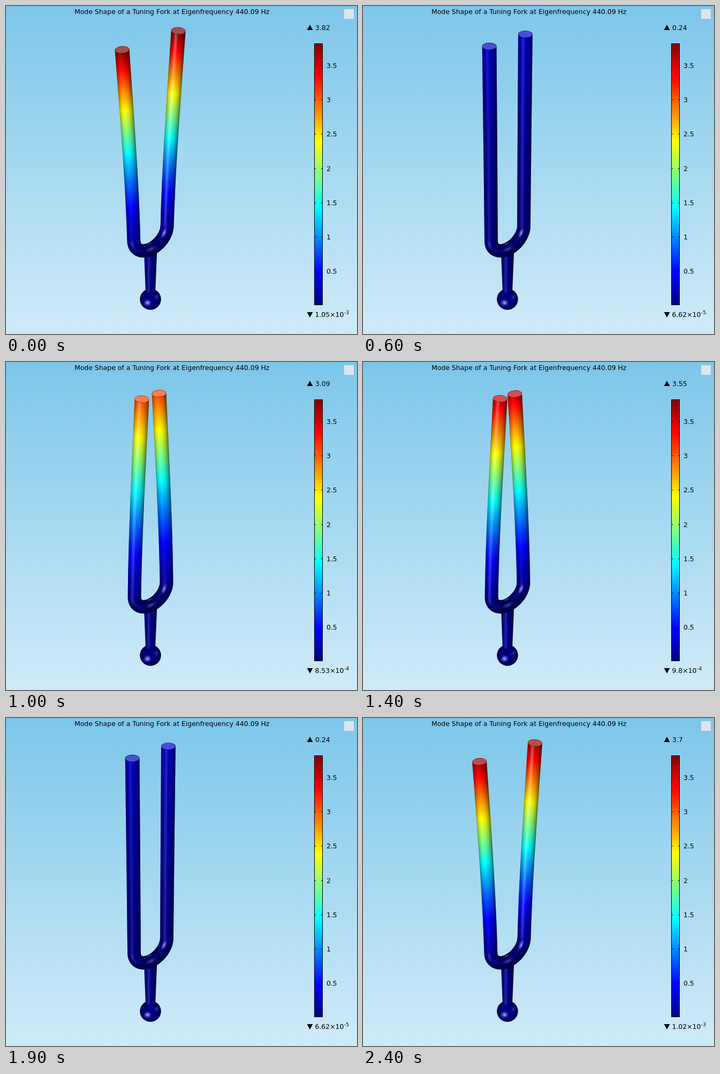
Animation of 656x614 px, one loop 2500 ms. Source, as an HTML page with a canvas:

```html
<!DOCTYPE html>
<html lang="en">
<head>
<meta charset="utf-8">
<title>Tuning fork mode shape</title>
<style>
html, body { margin: 0; width: 656px; height: 614px; overflow: hidden; }
canvas { display: block; }
</style>
</head>
<body>
<canvas id="stage" width="656" height="614"></canvas>
<script>
const ctx = document.getElementById('stage').getContext('2d');
const LOOP = 2500, STEP = 100;
const MAX = 3.816, MIN = 1.0543e-3;
const REACH = 420;   // length of a vibrating arm, down to the middle of the bend
const ARM = 361;     // straight part of it
const FONT = '"DejaVu Sans", sans-serif';

const clamp = (v, lo = 0, hi = 1) => Math.min(hi, Math.max(lo, v));
const lerp = (a, b, k) => a + (b - a) * k;

const left = { tip: [237.4, 75.1], base: [239.5, 440], sway: [-20.4, 6.9] };
const right = { tip: [302.2, 53.4], base: [300.5, 412], sway: [20, -6.9] };

// First bending mode of a cantilever, 1 at the free end
function bend(x) {
  const b = 1.8751 * x;
  return (Math.cosh(b) - Math.cos(b) - 0.7341 * (Math.sinh(b) - Math.sin(b))) / 2;
}

const jet = v => [3, 2, 1].map(k => 255 * clamp(1.5 - Math.abs(4 * v - k)));

function css(color, shade = 1, white = 0) {
  return `rgb(${color.map(c => Math.round(lerp(c * shade, 255, white))).join()})`;
}

function linear(x0, y0, x1, y1, count, colorAt) {
  const g = ctx.createLinearGradient(x0, y0, x1, y1);
  for (let i = 0; i <= count; i++) g.addColorStop(i / count, colorAt(i / count));
  return g;
}

function ellipse(x, y, rx, ry, fill, turn = 0) {
  ctx.beginPath();
  ctx.ellipse(x, y, rx, ry, turn, 0, 7);
  ctx.fillStyle = fill;
  ctx.fill();
}

function polygon(points, fill) {
  ctx.beginPath();
  points.forEach(p => ctx.lineTo(...p));
  ctx.closePath();
  ctx.fillStyle = fill;
  ctx.fill();
}

function glow(x, y, rx, ry, turn, alpha) {
  ctx.save();
  ctx.translate(x, y);
  ctx.rotate(turn);
  ctx.scale(rx, ry);
  const g = ctx.createRadialGradient(0, 0, 0, 0, 0, 1);
  g.addColorStop(0, `rgba(215,215,255,${alpha})`);
  g.addColorStop(0.4, `rgba(190,190,250,${alpha * 0.55})`);
  g.addColorStop(1, 'rgba(150,150,240,0)');
  ellipse(0, 0, 1, 1, g);
  ctx.restore();
}

function text(str, x, y, size = 12.45) {
  ctx.font = `${size}px ${FONT}`;
  ctx.fillStyle = '#000';
  ctx.fillText(str, x, y);
  return x + ctx.measureText(str).width;
}

function armPoint(arm, k, amp) {
  const v = bend(1 - k * ARM / REACH);
  const at = i => lerp(arm.tip[i], arm.base[i], k) + amp * v * arm.sway[i];
  return { x: at(0), y: at(1), r: lerp(13.4, 12.4, k), v, curve: 0 };
}

function bendPoint(angle, amp) {
  const c = Math.cos(angle), s = Math.sin(angle);
  const v = bend((1 - ARM / REACH) * Math.abs(1 - angle / (Math.PI / 2)));
  const sway = (c > 0 ? left : right).sway;
  return {
    x: 270 - 30.5 * c + amp * v * sway[0],
    y: 426 + 14 * c + 29.2 * s + amp * v * sway[1],
    r: 12.4, v, curve: s
  };
}

// Centre line: down the left arm, round the bend, up the right arm
function centreLine(amp) {
  const points = [], n = 150, m = 60;
  for (let i = 0; i < n; i++) points.push(armPoint(left, i / n, amp));
  for (let i = 0; i <= m; i++) points.push(bendPoint(Math.PI * i / m, amp));
  for (let i = n - 1; i >= 0; i--) points.push(armPoint(right, i / n, amp));
  return points;
}

function drawTube(amp) {
  const points = centreLine(amp), size = Math.abs(amp);
  points.forEach((p, i) => {
    const a = points[Math.max(0, i - 1)], b = points[Math.min(points.length - 1, i + 1)];
    const dx = b.x - a.x, dy = b.y - a.y, len = Math.hypot(dx, dy);
    const nx = -dy / len * p.r, ny = dx / len * p.r;
    const lit = 0.3 * dy / len;
    const tilt = p.curve ? 0 : -dx / dy;
    const shine = clamp(0.12 + 3 * tilt, 0.04, 0.4) * (1 - p.curve);
    const dim = 1 - 0.25 * p.curve;
    const color = jet(size * p.v);
    ctx.strokeStyle = linear(p.x - nx, p.y - ny, p.x + nx, p.y + ny, 16, k => {
      const u = 2 * k - 1;
      const shade = (0.62 + 0.38 * Math.cos((u - lit) * 1.25)) * (1 - 0.28 * u ** 4);
      return css(color, shade * dim, shine * Math.exp(-(((u - lit) / 0.2) ** 2)));
    });
    const end = i === 0 || i === points.length - 1;
    ctx.lineWidth = end ? 1 : len / 2 + 1 + p.curve;
    ctx.beginPath();
    ctx.moveTo(p.x - nx, p.y - ny);
    ctx.lineTo(p.x + nx, p.y + ny);
    ctx.stroke();
  });
  glow(295.5, 425, 4.5, 11, 0.4, 0.75);
  glow(271, 455, 13, 5, -0.45, 0.35);
  glow(268, 445, 8, 2, -0.35, 0.4);
  glow(236, 447, 4, 11, -0.15, 0.15);

  for (const arm of [left, right]) {
    const p = armPoint(arm, 0, amp);
    const lean = amp * 0.07 * Math.sign(arm.sway[0]);
    ellipse(p.x, p.y, 13.5, 6.7, css(jet(size), 0.65), lean);
    ellipse(p.x, p.y, 12.9, 6.1, css(jet(size), 1, 0.3), lean);
  }
}

function drawHandle() {
  const ball = ctx.createRadialGradient(266, 552, 2, 270, 549, 20);
  ball.addColorStop(0, 'rgb(0,0,138)');
  ball.addColorStop(0.6, 'rgb(0,0,118)');
  ball.addColorStop(1, 'rgb(0,0,66)');
  ellipse(270, 549, 19.8, 19.8, ball);
  glow(264.5, 555.5, 8, 7, 0, 0.85);
  glow(281, 545, 5, 7, 0.5, 0.25);

  polygon([[257.8, 455], [282.4, 455], [279.2, 532], [275, 536.5], [265, 536.5], [260.8, 532]],
    linear(259, 0, 281, 0, 12, k => {
      const u = 2 * k - 1;
      return css([0, 0, 135], 0.55 + 0.45 * Math.cos((u + 0.3) * 1.3),
        0.15 * Math.exp(-(((u + 0.3) / 0.2) ** 2)));
    }));
}

function drawLegend(size) {
  ctx.fillStyle = linear(0, 560, 0, 70, 64, k => css(jet(k)));
  ctx.fillRect(576, 70, 16, 490);
  ctx.strokeStyle = '#000';
  ctx.lineWidth = 1;
  ctx.strokeRect(576.5, 70.5, 15, 489);
  for (let v = 0.5; v < MAX; v += 0.5) {
    const y = Math.round(560.2 - v * 128.33);
    ctx.fillStyle = '#000';
    ctx.fillRect(576, y, 3, 1);
    ctx.fillRect(589, y, 3, 1);
    text(String(v), 599, y + 4.5);
  }

  polygon([[562.5, 45], [573.5, 45], [568, 35]], '#000');
  text(String(+(MAX * size).toFixed(2)), 578, 45);

  polygon([[562.5, 573], [573.5, 573], [568, 583]], '#000');
  const low = MIN * size, power = Math.floor(Math.log10(low));
  const end = text(+(low / 10 ** power).toFixed(2) + '×10', 577.5, 582);
  text('-' + -power, end + 0.5, 577, 9.3);
}

function draw(time) {
  const amp = Math.cos(2 * Math.PI * time / LOOP);
  ctx.fillStyle = linear(0, 0, 0, 614, 1, k => k ? 'rgb(207,235,248)' : 'rgb(125,198,233)');
  ctx.fillRect(0, 0, 656, 614);
  text('Mode Shape of a Tuning Fork at Eigenfrequency 440.09 Hz', 128, 15);
  ctx.fillStyle = '#dde4ee';
  ctx.fillRect(632, 6, 18, 18);
  drawHandle();
  drawTube(amp);
  drawLegend(Math.abs(amp));
}

const start = performance.now();
let shown = -1;
function tick() {
  const time = (performance.now() - start) % LOOP;
  const step = Math.floor(time / STEP);
  if (step !== shown) draw(step * STEP);
  shown = step;
  requestAnimationFrame(tick);
}
tick();
</script>
</body>
</html>
```
